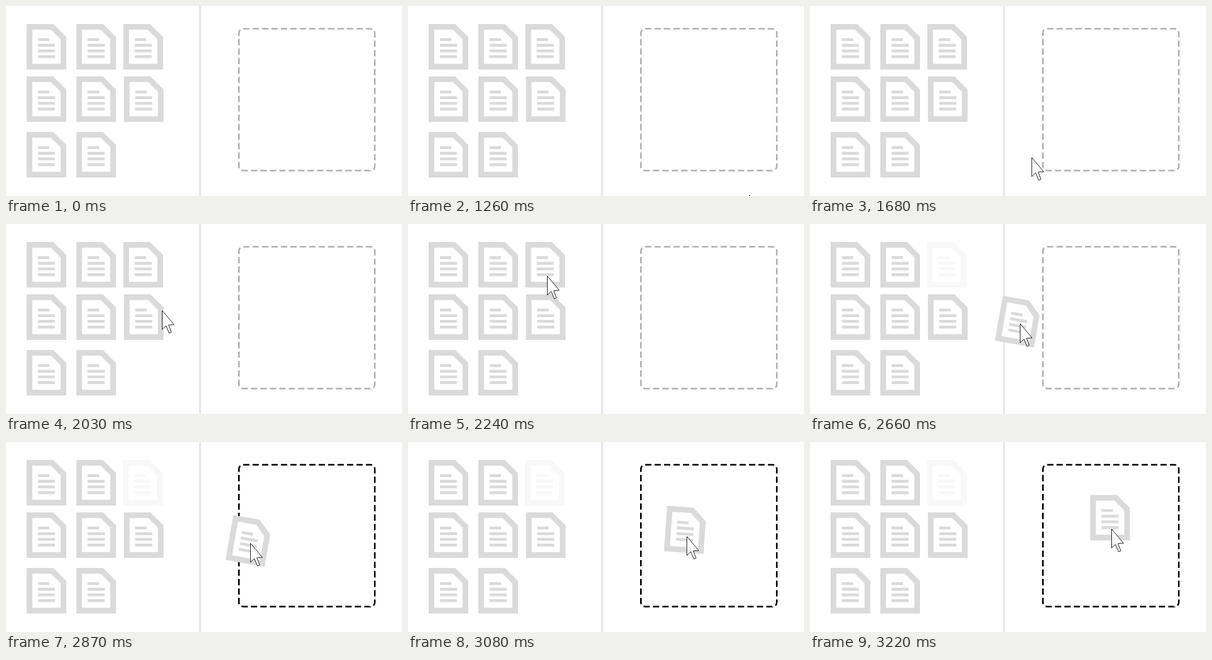
Recreate the animation shown at these times as an HTML page. Size 749 px wide and 359 px high, loop 5320 ms.

```html
<!DOCTYPE html>
<html lang="en">
<head>
<meta charset="utf-8">
<title>Drag and drop</title>
<style>
  html, body { margin: 0; width: 100%; height: 100%; overflow: hidden; background: #fff; }
  svg { display: block; }
</style>
</head>
<body>
<svg width="749" height="359" viewBox="0 0 749 359">
  <defs>
    <g id="doc">
      <path fill="#dadada" d="M0 0H50.3L75 24.5V86H0Z"/>
      <path fill="#fff" d="M10.7 10.7H46L64.3 29V75.3H10.7Z"/>
      <path stroke="#dadada" stroke-width="5.4" d="M21.4 29.5h21.5M21.4 40.2h32.2M21.4 50.9h32.2M21.4 61.7h32.2"/>
    </g>
  </defs>
  <rect x="365" width="4" height="359" fill="#e8e8e8"/>
  <!-- 58 dashes fit the outline exactly -->
  <rect id="zone" x="440.5" y="43" width="257" height="268" rx="8" fill="none"
    stroke-width="3" pathLength="1044" stroke-dasharray="12 6"/>
  <g id="files"></g>
  <use id="dragged" href="#doc"/>
  <path id="cursor" fill="#fff" stroke="#000"
    d="M.5 .5V36.3L7.8 29.3L13.6 43.3L17.8 41.5L12.6 27.8L23 27.2Z"/>
</svg>
<script>
const LOOP = 5320, STEP = 70;
const ENTER = 1260, REACH = 2240, HOVER = 2800, DROP = 3220;

// Cursor paths: cubic curves, start, two handles, end.
const approach = { x: [645.5, 450, 285.5, 263], y: [357, 368, 182, 98.5] };
const carry = { x: [263, 370, 471, 570], y: [98.5, 224, 200, 164.5] };

const byId = id => document.getElementById(id);
const clamp = v => Math.min(1, Math.max(0, v));
const show = (el, on) => el.setAttribute('visibility', on ? 'visible' : 'hidden');

function bezier([a, b, c, d], u) {
  const v = 1 - u;
  return a * v ** 3 + 3 * b * v * v * u + 3 * c * v * u * u + d * u ** 3;
}

const files = byId('files'), zone = byId('zone'), dragged = byId('dragged'), cursor = byId('cursor');

for (const y of [34, 133, 238])
  for (const x of [39, 133, 223])
    if (files.childElementCount < 8)
      files.insertAdjacentHTML('beforeend', `<use href="#doc" x="${x}" y="${y}"/>`);
const picked = files.children[2];

function draw(now) {
  const t = Math.floor((now % LOOP) / STEP) * STEP;
  const grabbed = t > REACH;
  const reach = clamp((t - ENTER) / (REACH - ENTER));
  const drag = clamp((t - REACH) / (DROP - REACH));
  const path = grabbed ? carry : approach;
  const x = bezier(path.x, grabbed ? drag : reach);
  const y = bezier(path.y, grabbed ? drag : reach);

  show(cursor, t >= ENTER);
  cursor.setAttribute('transform', `translate(${Math.floor(x)} ${Math.floor(y)})`);

  // The file rises towards the pointer and leans while it is carried.
  const lift = 4 * drag * (1 - drag);
  const tilt = 10 * clamp(Math.min(7 * drag, 2.8 * (1 - drag)));
  const sag = 21.5 - 18 * lift;
  show(dragged, grabbed);
  dragged.setAttribute('transform',
    `translate(${x - 2.5 - lift} ${y - sag}) rotate(${tilt}) translate(-37.5 -43)`);

  picked.setAttribute('x', grabbed ? 221 : 222);
  picked.setAttribute('opacity', grabbed ? 0.18 : 1);
  zone.setAttribute('stroke', t >= HOVER ? '#000' : '#b0b0b0');
}

const start = performance.now();
function tick() {
  draw(performance.now() - start);
  requestAnimationFrame(tick);
}
tick();
</script>
</body>
</html>
```
